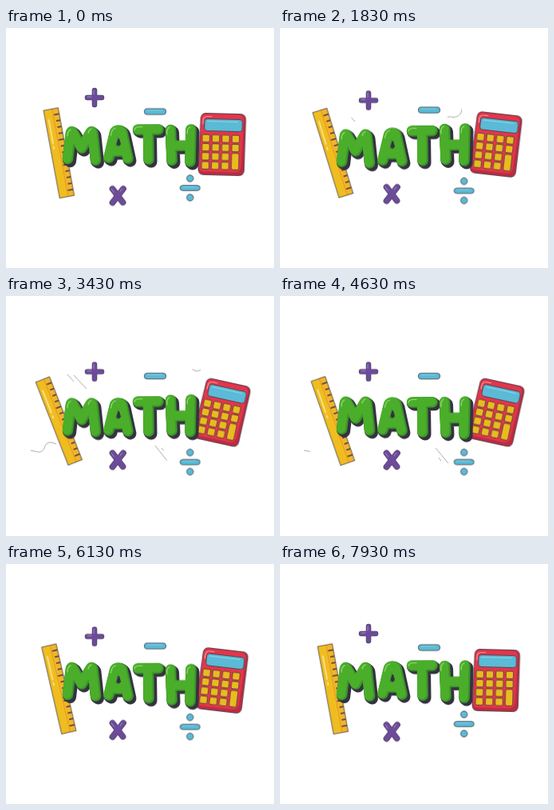
These frames come from a looping animation (336 px wide and 300 px high, 8000 ms). An HTML page without scripts:

```html
<!DOCTYPE html>
<html lang="en">
<head>
<meta charset="utf-8">
<title>Math</title>
<style>
html, body { margin: 0; width: 100%; height: 100%; overflow: hidden; background: #fff; }
svg { display: block; width: 336px; height: 300px; }

.bob, .tilt { animation: bob 4s cubic-bezier(.37, 0, .63, 1) var(--d, 0s) infinite alternate; }
.tilt { animation-name: tilt; }
@keyframes bob {
  from { transform: translateY(calc(var(--a) * -1)); }
  to { transform: translateY(var(--a)); }
}
@keyframes tilt {
  from { transform: rotate(var(--from)); }
  to { transform: rotate(var(--to)); }
}

.ink { stroke: #3a3442; stroke-width: .75; }
.round { fill: none; stroke-linecap: round; stroke-linejoin: round; }
.shade { stroke: #35323f; stroke-width: 15; }
.edge { stroke: #3b962b; stroke-width: 13.6; }
.face { stroke: #4bae2a; stroke-width: 11.2; }
.shine { stroke: #9bdc7c; stroke-width: 1.2; }

/* Hairlines draw on from the start, then erase from the start. */
.hair path {
  fill: none; stroke: #77747c; stroke-width: .6; stroke-dasharray: 1 3;
  animation: trace 8s linear var(--d) infinite backwards;
}
@keyframes trace {
  0% { stroke-dashoffset: 1; }
  11%, 17% { stroke-dashoffset: 0; }
  28%, 100% { stroke-dashoffset: -1; }
}
</style>
</head>
<body>
<svg viewBox="0 0 336 300" role="img" aria-label="Math">
  <defs>
    <path id="m" d="M77.500 165.500 L81.500 133 Q83 130 85 134 L95 152 L106 133 Q108 130 109 134 L112.500 167"/>
    <path id="a" d="M129 165 L136.500 134 Q137.500 131 141 131 Q145 131 146 134 L153 166 M135 157 H150"/>
    <path id="t" d="M165.500 130 L191 129.700 M178.500 131 L179 167"/>
    <path id="h" d="M206.500 129.500 L208 167.500 M232 129 L231 169 M208 149.500 L231 149"/>
    <rect id="key" x="-4.700" y="-4.600" width="9.400" height="9.200" rx="1.700" fill="#e8bb1f" class="ink"/>
    <g id="keys">
      <use href="#key" x="-20.300"/><use href="#key" x="-7.900"/><use href="#key" x="4.500"/>
    </g>
    <path id="ticks" d="M9 0 H2.500 M9 8 H4 M9 16 H4 M9 24 H4"/>
  </defs>

  <rect width="336" height="300" fill="#fff"/>

  <g class="hair">
    <path pathLength="1" style="--d:1.4s" d="M210 112 C213 109 216 113 220 111 C226 110 229 105 227 98 C229 94 232 91 235 92 Q239 96 244 92"/>
    <path pathLength="1" style="--d:1.6s" d="M94 117 L77 98"/>
    <path pathLength="1" style="--d:2.3s" d="M101 116 L85 99"/>
    <path pathLength="1" style="--d:2.57s" d="M63 185 C52 180 50 185 48 190 C45 197 40 195 36 194 L30 193"/>
    <path pathLength="1" style="--d:2.57s" d="M187 187 L202 206"/>
    <path pathLength="1" style="--d:3.28s" d="M195 190 L211 209"/>
  </g>

  <!-- ruler -->
  <g transform="translate(66.300 156.200)">
    <g class="tilt" style="--from:-10deg;--to:-21.5deg;--d:-.5s">
      <rect x="-9.200" y="-55.800" width="18.400" height="111.600" fill="#efbd20"/>
      <rect x="1.500" y="-55.800" width="7.700" height="111.600" fill="#f2b42b"/>
      <path d="M1.500 -55.800 V55.800" stroke="#e2981f" stroke-width=".9"/>
      <path d="M-5 -43 V-13 M-5 -9 V-6" stroke="#fff0b4" stroke-width="1.300" stroke-linecap="round"/>
      <g stroke="#3a3442" stroke-width="1.500">
        <use href="#ticks" y="-48"/><use href="#ticks" y="-16"/><use href="#ticks" y="16"/>
        <path d="M9 48 H2.500"/>
      </g>
      <rect x="-9.200" y="-55.800" width="18.400" height="111.600" fill="none" class="ink"/>
    </g>
  </g>

  <!-- calculator -->
  <g transform="translate(270.800 145.500)">
    <g class="tilt" style="--from:1.5deg;--to:13deg">
      <path d="M-21 -38.500 H22 Q29 -38.500 29 -31 L28.500 31 Q28.500 38.500 22 38.500 H-22 Q-29 38.500 -29 31 L-27.500 -31 Q-27.500 -38.500 -21 -38.500 Z" fill="#b92c42" class="ink"/>
      <path d="M-20 -37.500 H20 Q26.500 -37.500 26.500 -30 L24.500 27 Q24 34.500 17 34.500 H-22 Q-28 34.500 -28 29 L-26.800 -31 Q-26.800 -37.500 -20 -37.500 Z" fill="#e3364b"/>
      <path d="M-24.500 -25 V-29 Q-24.500 -34.500 -19 -34.500 H-14" class="round" stroke="#f79aa2" stroke-width="1.200"/>
      <rect x="-22.500" y="-31.500" width="47.500" height="15" rx="3.500" fill="#5bbad5" class="ink"/>
      <path d="M-19 -28.500 H19" class="round" stroke="#8ed5e6"/>
      <use href="#keys" y="-7.200"/><use href="#keys" y="4.100"/>
      <use href="#keys" y="15.400"/><use href="#keys" y="26.700"/>
      <use href="#key" x="17" y="-7.200"/><use href="#key" x="17" y="4.100"/>
      <rect x="12.300" y="10.800" width="9.400" height="20.500" rx="2.200" fill="#e8bb1f" class="ink"/>
    </g>
  </g>

  <!-- lettering -->
  <g class="round">
    <g class="bob" style="--a:2.7px;--d:-1s">
      <use href="#m" x="1" y="1.500" class="shade"/><use href="#m" x="3" y="3" class="shade"/>
      <use href="#m" class="edge"/><use href="#m" x="-1" y="-.7" class="face"/>
      <path class="shine" d="M77 137 Q77 131 81 129 M103 133 Q104 129 107 128"/>
    </g>
    <g class="bob" style="--a:3px;--d:-.3s">
      <use href="#a" x="1" y="1.500" class="shade"/><use href="#a" x="3" y="3" class="shade"/>
      <use href="#a" class="edge"/><use href="#a" x="-1" y="-.7" class="face"/>
      <path d="M139.500 148 L141.300 142 L143 148 Z" fill="#35323f" stroke="#35323f" stroke-width="2"/>
      <path class="shine" d="M131.500 137 Q132.500 129 137.500 128"/>
    </g>
    <g class="bob" style="--a:3px;--d:-7.6s">
      <use href="#t" x="1" y="1.500" class="shade"/><use href="#t" x="3" y="3" class="shade"/>
      <use href="#t" class="edge"/><use href="#t" x="-1" y="-.7" class="face"/>
      <path class="shine" d="M161 130 Q162 126.500 167 126.500 H171"/>
    </g>
    <g class="bob" style="--a:3.5px;--d:-6.8s">
      <use href="#h" x="1" y="1.500" class="shade"/><use href="#h" x="3" y="3" class="shade"/>
      <use href="#h" class="edge"/><use href="#h" x="-1" y="-.7" class="face"/>
      <path class="shine" d="M202 135 Q201 128 205 126 M227 134 Q227 127 231 126"/>
    </g>
  </g>

  <!-- plus -->
  <g transform="translate(111 91)">
    <g class="bob round" style="--a:4px">
      <path d="M-9 0 H9 M0 -9 V9" stroke="#3a3442" stroke-width="6.500"/>
      <path d="M-9 0 H9 M0 -9 V9" stroke="#6d4b9b" stroke-width="5.500"/>
      <path d="M-9 -1 H-4 M-1 -9 V-4" stroke="#a58bc9" stroke-width="1"/>
    </g>
  </g>

  <!-- minus -->
  <g transform="translate(187 102.200)">
    <g class="bob" style="--a:-2.3px">
      <rect x="-13.700" y="-3.700" width="27.400" height="7.400" rx="3.600" fill="#5bbad5" class="ink"/>
      <path d="M-10 -1.500 H8" class="round" stroke="#7fcde0"/>
    </g>
  </g>

  <!-- times -->
  <g transform="translate(140 207)">
    <g class="bob round" style="--a:-2.5px">
      <path d="M-6.500 -8.500 L6.500 8.500 M7 -8.500 L-6.500 8.800" stroke="#3a3442" stroke-width="7.700"/>
      <path d="M-6.500 -8.500 L6.500 8.500 M7 -8.500 L-6.500 8.800" stroke="#6d4b9b" stroke-width="6.600"/>
      <path d="M-8 -8.500 L-4.500 -4 M5.500 -8.500 L3 -5" stroke="#a58bc9" stroke-width="1"/>
    </g>
  </g>

  <!-- divide -->
  <g transform="translate(230.700 204)">
    <g class="bob" style="--a:4px" fill="#5bbad5">
      <rect x="-12.500" y="-3.300" width="25" height="6.600" rx="3.300" class="ink"/>
      <circle cy="-12" r="4.200" class="ink"/>
      <circle cy="12" r="4.200" class="ink"/>
      <path d="M-9 -1.300 H7 M-2 -13 L-1 -14 M-2 11 L-1 10" class="round" stroke="#7fcde0"/>
    </g>
  </g>
</svg>
</body>
</html>
```
